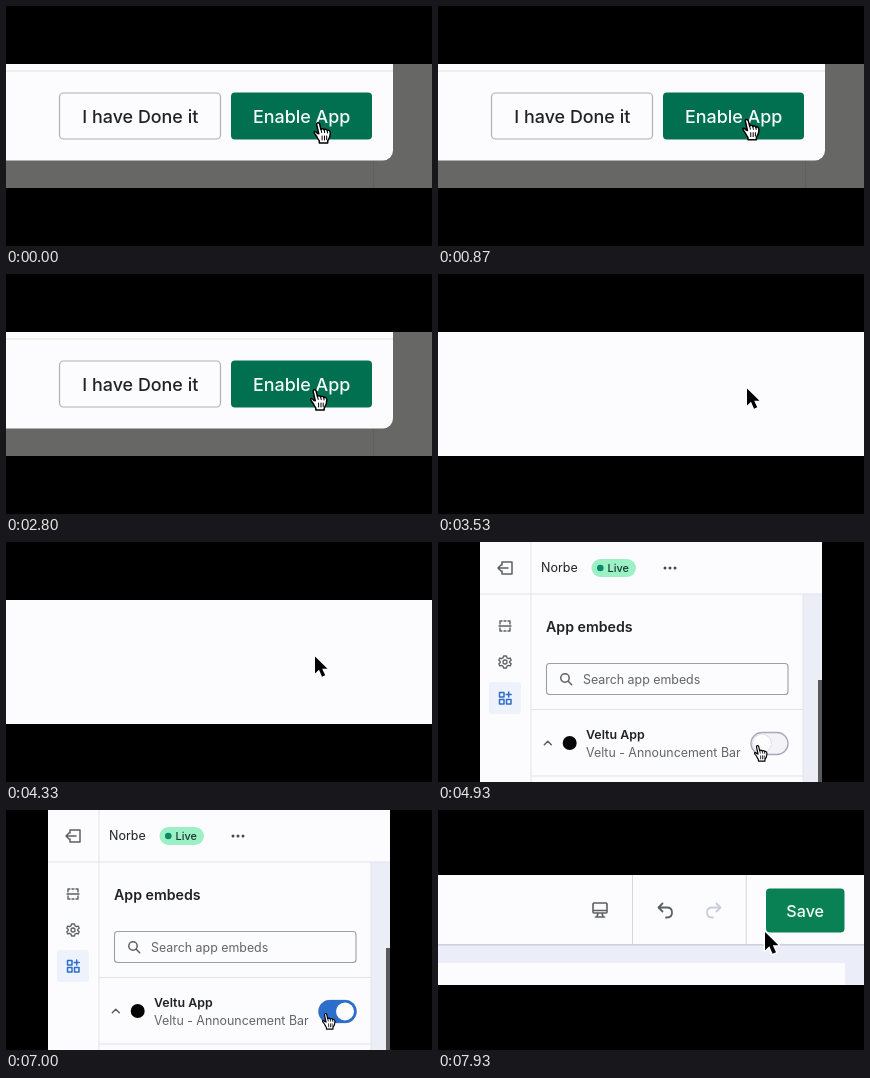
Animation, 426 px wide and 240 px high, one loop 8 s. Source, as an HTML page with a canvas:

```html
<!DOCTYPE html>
<html lang="en">
<head>
<meta charset="utf-8">
<title>Enable an app embed</title>
<style>
html, body { margin: 0; width: 100%; height: 100%; overflow: hidden; background: #000; }
canvas { display: block; width: 100vw; height: 100vh; }
</style>
</head>
<body>
<canvas id="stage"></canvas>
<script>
const W = 426, H = 240, LOOP = 8000;
const BLANK_AT = 3300, EMBED_AT = 4500, SAVE_AT = 7450, TOGGLE_AT = 5500;
const WHITE = '#fcfcfe', INK = '#202223', GREY = '#5c5f62', LINE = '#e1e2ec', BLUE = '#2c6ecb';
const canvas = document.getElementById('stage');
const ctx = canvas.getContext('2d');

const HAND = new Path2D('M4 11.5C2.6 9.7.4 8.7.7 10.5C.9 12 3 13.6 4 16C4.6 17.5 5.6 18 5.8 19.2V21H14.2V19C15.2 17.5 17 14.7 16.8 11C16.7 8 14.3 7.6 13.8 8.9C13.5 7 11.2 6.7 10.7 8C10.1 6.4 8 6.2 7.5 7.5L6.1 2C5.5.1 2.8.4 3.2 2.6L5.3 11.8');
const FOLDS = new Path2D('M7.5 7.5L8.2 10.5M10.7 8L11.2 10.7M13.8 8.9L14 11M8.6 14V18M11 14V18M13.2 14V17.5');
const ARROW = new Path2D('M0 0V17L4 13.3L7 20.2L10.2 18.8L7.2 12.2H12.5Z');

const ease = p => p * p * (3 - 2 * p);
const clamp = p => Math.min(1, Math.max(0, p));
const mix = (a, b, p) => a + (b - a) * p;

// keys: [time, x, y]
function along(keys, t) {
  let i = 1;
  while (i < keys.length - 1 && t > keys[i][0]) i++;
  const a = keys[i - 1], b = keys[i];
  const p = ease(clamp((t - a[0]) / (b[0] - a[0])));
  return [mix(a[1], b[1], p), mix(a[2], b[2], p)];
}

function rect(x, y, w, h, color) {
  ctx.fillStyle = color;
  ctx.fillRect(x, y, w, h);
}

function box(x, y, w, h, r, fill, border, lineWidth = 1) {
  ctx.beginPath();
  ctx.roundRect(x, y, w, h, r);
  if (fill) { ctx.fillStyle = fill; ctx.fill(); }
  if (border) { ctx.strokeStyle = border; ctx.lineWidth = lineWidth; ctx.stroke(); }
}

function dot(x, y, r, color) {
  ctx.beginPath();
  ctx.arc(x, y, r, 0, Math.PI * 2);
  ctx.fillStyle = color;
  ctx.fill();
}

function text(str, x, y, size, color, weight = 400, align = 'left') {
  ctx.font = `${weight} ${size}px Inter, sans-serif`;
  ctx.textAlign = align;
  ctx.fillStyle = color;
  ctx.fillText(str, x, y);
}

function icon(d, x, y, color, lineWidth = 1.5) {
  ctx.save();
  ctx.translate(x, y);
  ctx.strokeStyle = color;
  ctx.lineWidth = lineWidth;
  ctx.lineCap = ctx.lineJoin = 'round';
  ctx.stroke(new Path2D(d));
  ctx.restore();
}

function hand(x, y, scale = 1) {
  ctx.save();
  ctx.translate(x, y);
  ctx.scale(scale, scale);
  ctx.lineJoin = ctx.lineCap = 'round';
  ctx.fillStyle = '#fff';
  ctx.fill(HAND);
  ctx.strokeStyle = '#000';
  ctx.lineWidth = 1.5;
  ctx.stroke(HAND);
  ctx.lineWidth = 1;
  ctx.stroke(FOLDS);
  ctx.restore();
}

function arrow(x, y, scale = 1) {
  ctx.save();
  ctx.translate(x, y);
  ctx.scale(scale, scale);
  ctx.lineJoin = 'round';
  ctx.strokeStyle = '#fff';
  ctx.lineWidth = 2.6;
  ctx.stroke(ARROW);
  ctx.fillStyle = '#000';
  ctx.fill(ARROW);
  ctx.restore();
}

function drawDialog(t) {
  rect(0, 58, W, 124, '#676765');
  rect(367, 155, 1, 27, '#5f5f5f');
  ctx.beginPath();
  ctx.roundRect(-20, 58, 407, 96.5, [0, 0, 10, 0]);
  ctx.fillStyle = WHITE;
  ctx.fill();
  rect(0, 64.5, 387, 1, '#e2e1d8');
  box(53.5, 87, 161, 46, 4, WHITE, '#b0b1b5', 1.2);
  box(225, 86.5, 141, 47, 4, '#007050');
  text('I have Done it', 134.3, 117, 17.9, INK, 500, 'center');
  text('Enable App', 295.7, 117, 17.9, '#f4fbf8', 500, 'center');
  hand(...along([[0, 307.5, 116], [1000, 304, 112.5], [1670, 302.5, 112], [2800, 304, 115]], t));
}

function drawBlank() {
  rect(0, 58, W, 124, WHITE);
  arrow(309, 114.5);
}

function drawToggle(t) {
  const p = ease(clamp((t - TOGGLE_AT) / 160));
  box(313, 190.5, 37, 22, 11, '#f3f3f8', '#aaa9bb', 1.3);
  ctx.globalAlpha = p;
  box(312.4, 190, 38.2, 23, 11.5, BLUE);
  ctx.globalAlpha = 1;
  const x = mix(324, 339, p);
  dot(x, 201.5, 9.8, p < 0.5 ? '#dcdce6' : BLUE);
  dot(x, 201.5, 9, '#fdfdff');
}

function drawSidebar() {
  rect(42, 0, 342, H, WHITE);
  rect(365, 52, 19, 188, '#ebeef7');
  rect(380, 138, 4, 102, '#5a5a5c');
  rect(42, 51.5, 342, 1, LINE);
  rect(92.5, 0, 1, H, LINE);
  rect(364.5, 52, 1, 188, LINE);
  rect(93, 167, 272, 1, LINE);
  rect(93, 233.5, 272, 1, LINE);

  icon('M-3-3V-6H7V6H-3V3M3 0H-7M-4-3L-7 0L-4 3', 67, 26, GREY);
  icon('M-5-2V-5H-3M3-5H5V-2M-1-5H1M-5 2V5H-3M3 5H5V2M-1 5H1M-6 0H6', 67, 84, GREY, 1.4);
  icon('M-1.4-6H1.4L2-4.2L3.7-3.4L5.2-4L6.2-1.8L4.7-.6V.6L6.2 1.8L5.2 4L3.7 3.4L2 4.2L1.4 6H-1.4L-2 4.2L-3.7 3.4L-5.2 4L-6.2 1.8L-4.7.6V-.6L-6.2-1.8L-5.2-4L-3.7-3.4L-2-4.2ZM2 0A2 2 0 1 1-2 0A2 2 0 1 1 2 0', 67, 120, GREY, 1.3);
  box(51, 140, 32, 32, 3, '#eef2fb');
  icon('M-5.5-5.5H-1V-1H-5.5ZM-5.5 1.5H-1V6H-5.5ZM1.5 1.5H6V6H1.5ZM3.7-6V-1M1.2-3.5H6.2', 67, 156, BLUE);

  text('Norbe', 103, 30, 12.5, INK);
  box(153.5, 17, 44.5, 18, 9, '#9cf0c6');
  dot(162.3, 26, 3.3, '#0b8a62');
  text('Live', 169.5, 30, 10.9, '#17392d', 500);
  for (const x of [227, 232, 237]) dot(x, 26, 1.5, '#45484c');

  text('App embeds', 108, 90, 14.2, INK, 600);
  box(108.5, 121.5, 241.5, 31, 3, WHITE, '#9b9fa8', 1.1);
  icon('M3.2-1A4.2 4.2 0 1 1-5.2-1A4.2 4.2 0 1 1 3.2-1M2 2L5.7 5.7', 128, 137, GREY);
  text('Search app embeds', 145, 141.5, 12.4, '#62656a');

  icon('M-3.5 1.8L0-1.8L3.5 1.8', 109.8, 201, GREY);
  dot(131.7, 201, 7, '#050505');
  text('Veltu App', 148, 196.5, 12.4, INK, 600);
  text('Veltu - Announcement Bar', 148, 214.7, 12.4, '#62656a');
}

function drawEmbeds(t) {
  drawSidebar();
  drawToggle(t);
  const [x, y] = along([[EMBED_AT, 298, 222], [4880, 316, 203]], t);
  if (x < 311) arrow(x + 3, y, 0.8);
  else hand(x, y, 0.77);
}

function drawSave(t) {
  rect(0, 65, W, 110, WHITE);
  rect(0, 135, W, 40, '#ebeef8');
  rect(0, 134, W, 1.6, '#d0d1da');
  rect(0, 153, 407, 22, WHITE);
  rect(194, 65, 1, 69, '#d5d6de');
  rect(307.7, 65, 1, 69, '#d5d6de');
  icon('M-6-7H6Q7-7 7-6V2Q7 3 6 3H-6Q-7 3-7 2V-6Q-7-7-6-7ZM-7 .5H7M-2 3L-3 7M2 3L3 7M-4.5 7H4.5', 162, 100, GREY, 1.6);
  const turn = 'M-2.5-7L-6.5-3L-2.5 1M-6-3H2Q7-3 7 2Q7 7 2 7H1';
  icon(turn, 227, 100.5, GREY, 1.8);
  ctx.save();
  ctx.translate(276, 100.5);
  ctx.scale(-1, 1);
  icon(turn, 0, 0, '#c9ccda', 1.8);
  ctx.restore();
  box(328, 78.5, 78.5, 44, 4, '#0a8055');
  text('Save', 367.2, 106.5, 16.1, '#f5fcf8', 500, 'center');
  arrow(...along([[SAVE_AT, 298, 140], [7930, 327, 122]], t), 1.08);
}

function draw(t) {
  rect(0, 0, W, H, '#000');
  if (t < BLANK_AT) drawDialog(t);
  else if (t < EMBED_AT) drawBlank();
  else if (t < SAVE_AT) drawEmbeds(t);
  else drawSave(t);
}

function resize() {
  const ratio = window.devicePixelRatio || 1;
  canvas.width = Math.round(innerWidth * ratio);
  canvas.height = Math.round(innerHeight * ratio);
}

function frame() {
  ctx.setTransform(canvas.width / W, 0, 0, canvas.height / H, 0, 0);
  draw(performance.now() % LOOP);
  requestAnimationFrame(frame);
}

addEventListener('resize', resize);
resize();
frame();
</script>
</body>
</html>
```
